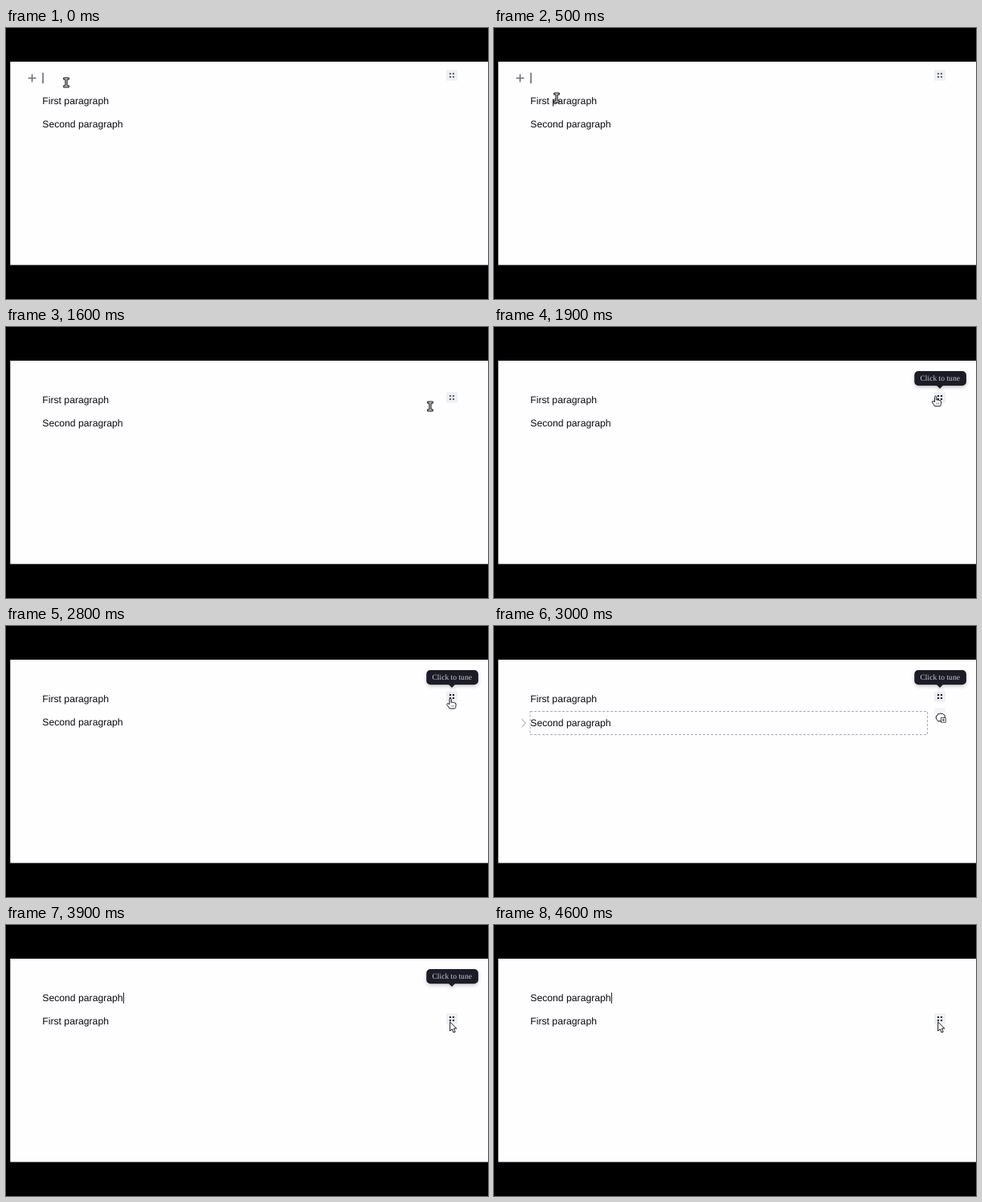
Write an HTML page that moves like this. It is 600 px wide and 338 px high and loops after 4800 ms.

```html
<!DOCTYPE html>
<html lang="en">
<head>
<meta charset="utf-8">
<title>Block dragging</title>
<style>
  html, body { margin: 0; width: 100%; height: 100%; overflow: hidden; background: #000; }
  svg { display: block; width: 100%; height: 100%; }
  text { text-rendering: geometricPrecision; }
  .body { font: 12.2px "Liberation Sans", Arial, sans-serif; fill: #0c0c10; }
  .tip { font: 9.6px "Liberation Serif", "Times New Roman", serif; fill: #c9c8d2; text-anchor: middle; }
  .cursor path { fill: #fff; stroke: #16161c; stroke-width: 1; stroke-linejoin: round; }
</style>
</head>
<body>
<svg viewBox="0 0 600 338">
  <defs>
    <filter id="shadow" x="-20%" y="-40%" width="140%" height="200%">
      <feDropShadow dx="0" dy="2" stdDeviation="2" flood-color="#1d1a26" flood-opacity=".22"/>
    </filter>
  </defs>
  <rect width="600" height="338"/>
  <rect x="5.3" y="42" width="595" height="253.6" fill="#fefdff"/>

  <path id="plus" d="M27.5 62.5h10M32.5 57.5v10" stroke="#6c6c74" stroke-width="1.5"/>
  <g id="target" fill="none">
    <rect x="45" y=".5" width="494.5" height="29" stroke="#a3a3a8" stroke-width=".9" stroke-dasharray="3 2"/>
    <path d="M34.3 10l5.2 5-5.2 5" stroke="#8d8d93"/>
  </g>
  <text id="first" class="body" x="45.3">First paragraph</text>
  <text id="second" class="body" x="45.3">Second paragraph</text>
  <path id="caret" d="M0 0v13.5" stroke="#17171b"/>

  <g id="handle">
    <rect x="-7" y="-6.7" width="14" height="13.4" rx="1.5" fill="#eff0f5"/>
    <path id="dots" d="M-3.1-2h2.2M.9-2h2.2M-3.1 2h2.2M.9 2h2.2" stroke-width="2.1"/>
  </g>

  <g id="tooltip">
    <g fill="#1d1a26" filter="url(#shadow)">
      <rect x="523.3" y="55" width="64.6" height="18.3" rx="5"/>
      <path d="M551 73h8l-4 4z"/>
    </g>
    <text class="tip" x="555.2" y="67.3">Click to tune</text>
  </g>

  <g id="beam" class="cursor">
    <path d="M-3.3-6h6.6v2.2h-2.2v7.6h2.2v2.2h-6.6v-2.2h2.2v-7.6h-2.2z" style="fill:#c4c4ca"/>
  </g>
  <g id="hand" class="cursor">
    <path d="M-2.4 1V-5q0-1.3 1.1-1.3T-.2-5v3.6q1.2-.9 2 .2 1.2-.7 1.9.4 1.7-.5 1.8 1.1V3Q5.5 5 4.2 6.3h-6.6Q-3 4.6-5.3 2 -6.3.4-5 0-3.8-.2-2.4 1z"/>
    <path d="M.5 2v2M2.5 2v2" style="stroke-width:.6"/>
  </g>
  <g id="fist" class="cursor">
    <rect x="-8" y="-12" width="14" height="11" fill="#f1f1f5" opacity=".6"/>
    <path d="M-5.8 0Q-6-2.3-4-2.5-3.7-5.4-1.6-4.3-.3-6 1-4.4 2.7-5.5 3.4-3.6 5.3-3.5 5.2-1.5V1.5Q4.8 4.7 3 4.7H-3.2Q-5.7 2.6-5.8 0z"/>
    <path d="M.4.3h5.8v5.8H.4zM1.8 3.2h3M3.3 1.7v3" style="stroke-width:.8"/>
  </g>
  <g id="arrow" class="cursor">
    <path d="M0 0v11.2l2.6-2.4 1.9 4.3 2-.9-1.9-4.1h3.6z"/>
  </g>
</svg>
<script>
const LOOP = 4800, TICK = 100;
const el = id => document.getElementById(id);
const cursors = ["beam", "hand", "fist", "arrow"];

// [start ms, cursor, x, y]
const pointer = [
  [0, "beam", 75, 68], [400, "beam", 75, 74], [500, "beam", 78, 87], [600, "beam", 80, 96],
  [1100, "beam", 112, 109], [1200, "beam", 232, 116], [1300, "beam", 400, 112], [1400, "beam", 504, 104],
  [1600, "beam", 528, 99], [1700, "hand", 548, 94], [1800, "hand", 551, 92.5],
  [2100, "hand", 553, 92.5], [2200, "hand", 555, 92.7], [2700, "hand", 554.5, 96.7],
  [2900, "fist", 555.5, 105], [3000, "fist", 556, 114], [3100, "fist", 556, 118],
  [3200, "fist", 556, 121], [3300, "fist", 556, 123], [3400, "fist", 556, 125],
  [3900, "arrow", 552.7, 121]
];
// [start ms, x, y]; no position means hidden
const carets = [[0, 46, 55.7], [800, 79.3, 84.3], [1400], [2000, 79.3, 84.3], [2500], [3900, 146.4, 84.3]];

const current = (keys, t) => keys.findLast(key => key[0] <= t);
const show = (id, on) => el(id).setAttribute("visibility", on ? "visible" : "hidden");
const place = (id, x, y) => el(id).setAttribute("transform", `translate(${x} ${y})`);
const clamp = v => Math.max(0, Math.min(1, v));

function draw(t) {
  const dropped = t >= 3900;
  const dragging = t >= 2900 && !dropped;
  const overFirst = dragging && t < 3000;
  const overSecond = dragging && !overFirst;

  show("plus", t < 800);
  show("target", dragging);
  place("target", 0, overFirst ? 77 : 106);
  el("first").setAttribute("y", dropped ? 124.2 : 95.2 + (overFirst ? 0.8 : 0));
  el("second").setAttribute("y", dropped ? 95.2 : 124.2 + (overSecond ? 0.8 : 0));

  const [, caretX, caretY] = current(carets, t);
  show("caret", caretX !== undefined);
  if (caretX !== undefined) place("caret", caretX, caretY);

  place("handle", 555, t < 800 ? 59 : dropped ? 117 : 88);
  el("dots").setAttribute("stroke", t < 1700 ? "#646775" : "#1d202b");

  const leaving = clamp((t - 3900) / 200);
  el("tooltip").setAttribute("opacity", clamp((t - 1600) / 200) * (1 - leaving));
  place("tooltip", 0, -5 * leaving);

  const [, kind, x, y] = current(pointer, t);
  cursors.forEach(id => show(id, id === kind));
  place(kind, x, y);
}

function frame(now) {
  draw(Math.floor((now % LOOP) / TICK) * TICK);
  requestAnimationFrame(frame);
}
draw(0);
requestAnimationFrame(frame);
</script>
</body>
</html>
```
